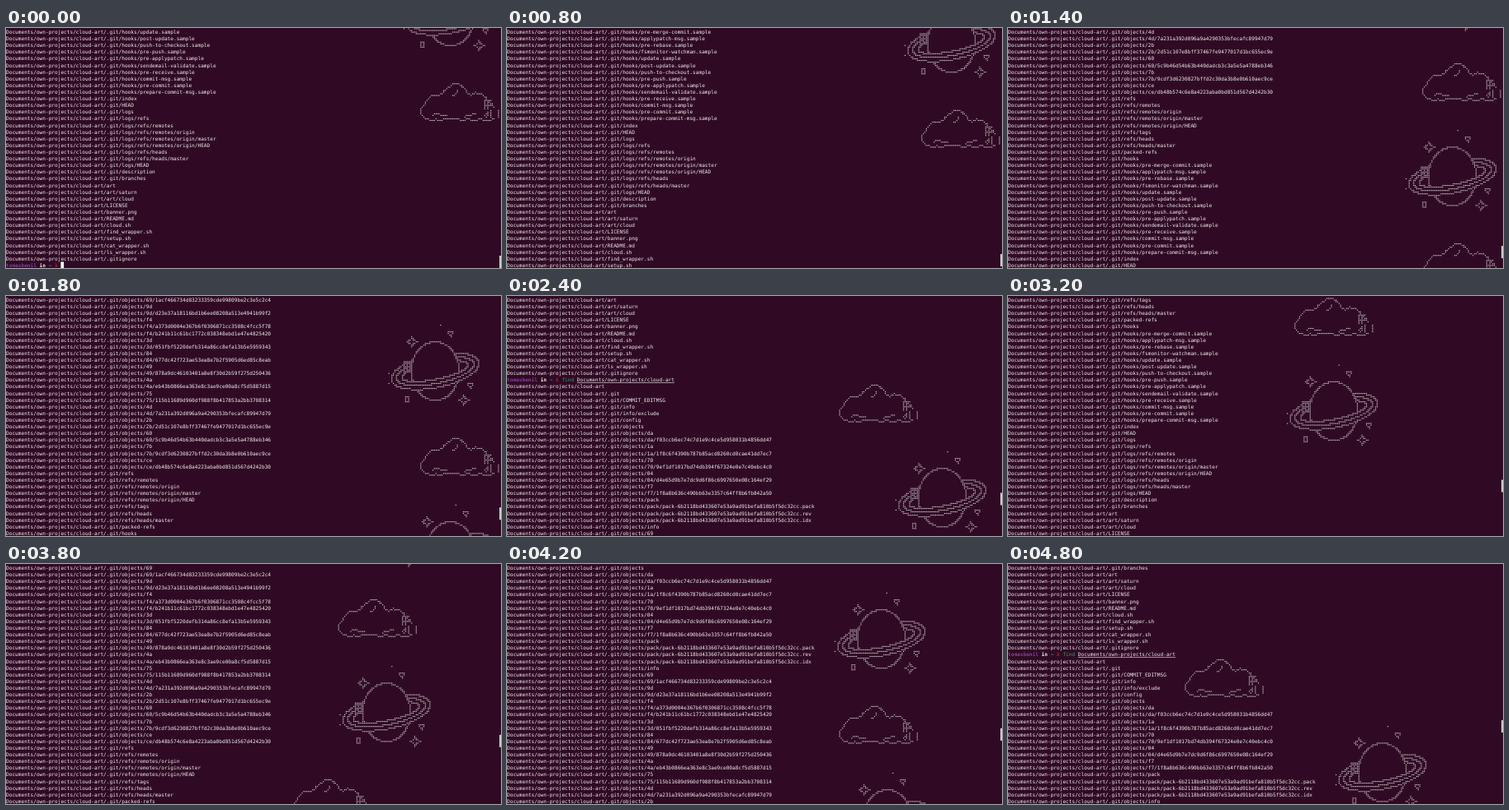
Recreate the animation shown at these times as an HTML page with a canvas. Size 600 by 292 pixels, loop 5 s.

```html
<!DOCTYPE html>
<html lang="en">
<head>
<meta charset="utf-8">
<title>Terminal scrollback</title>
<style>
  html, body { margin: 0; width: 100%; height: 100%; overflow: hidden; background: #300a24; }
  canvas { display: block; width: 600px; height: 292px; }
</style>
</head>
<body>
<canvas id="stage"></canvas>
<script>
const W = 600, H = 292, ROWS = 36, LOOP = 5000;
const CW = 3.69, RH = H / ROWS;
const DX = CW / 2, DY = RH / 4;
const INK = '#f0edf0';
const FONT = '6.13px "DejaVu Sans Mono", monospace';

const canvas = document.getElementById('stage');
const ctx = canvas.getContext('2d');
const ratio = window.devicePixelRatio || 1;
canvas.width = W * ratio;
canvas.height = H * ratio;
ctx.scale(ratio, ratio);

// ---- listing ----
const ROOT = 'Documents/own-projects/cloud-art';
const under = (dir, names) => names.split(' ').map(n => dir + '/' + n);

const blobs = `da/f03ccb6ec74c7d1e9c4ce5d958031b4856dd47
1a/1f8c6f4390b787b85acd8260cd0cae41dd7ec7
70/9ef1df1017bd74db394f67324e0e7c40ebc4c0
04/d4e65d9b7e7dc9d6f86c6997650e08c164ef29
f7/1f8a8b636c490bb63e3357c64ff8b6fb842a50
pack/pack-6b2118bd433607e53a9ad91befa810b5f5dc32cc.pack
pack/pack-6b2118bd433607e53a9ad91befa810b5f5dc32cc.rev
pack/pack-6b2118bd433607e53a9ad91befa810b5f5dc32cc.idx
info/
69/1acf466734d83233359cde99809be2c3e5c2c4
9d/d23e37a18116bd1b6ee08208a513e4941b99f2
f4/a373d0004e367b6f0306871cc3508c4fcc5f78
f4/b241b11c61bc1772c038348ebd1e47e4825420
3d/051fbf5220defb314a86cc8efa13b5e5959343
84/677dc42f723ae53ea8e7b2f5905d6ed85c8eab
49/878a9dc46103401a8e8f30d2b59f275d250436
4a/eb43b0866ea363e8c3ae9ce00a8cf5d5887d15
75/115b11689d960df988f8b417853a2bb3708314
4d/7a231a392d096a9a4290353bfecafc89947d79
2b/2d51c107e8bff37467fe9477017d1bc655ec9e
60/5c9b46d54b63b440dadcb3c3a5e5a4788eb346
7b/9cdf3d6230827bffd2c30da3b8e0b610aec9ce
ce/db48b574c6e8a4223aba0bd851d567d4242b30`.split('\n');

// Each directory is listed once, ahead of its files.
function objectLines() {
  const out = [];
  let last = '';
  for (const blob of blobs) {
    const [dir, file] = blob.split('/');
    if (dir !== last) out.push('.git/objects/' + dir);
    if (file) out.push('.git/objects/' + blob);
    last = dir;
  }
  return out;
}

const hooks = 'pre-merge-commit applypatch-msg pre-rebase fsmonitor-watchman update post-update ' +
  'push-to-checkout pre-push pre-applypatch sendemail-validate pre-receive commit-msg pre-commit prepare-commit-msg';

const listing = [
  ROOT,
  ...[
    '.git',
    ...under('.git', 'COMMIT_EDITMSG info info/exclude config objects'),
    ...objectLines(),
    ...under('.git', 'refs refs/remotes refs/remotes/origin refs/remotes/origin/master ' +
      'refs/remotes/origin/HEAD refs/tags refs/heads refs/heads/master packed-refs hooks'),
    ...under('.git/hooks', hooks).map(n => n + '.sample'),
    ...under('.git', 'index HEAD logs'),
    ...under('.git/logs', 'refs refs/remotes refs/remotes/origin refs/remotes/origin/master ' +
      'refs/remotes/origin/HEAD refs/heads refs/heads/master HEAD'),
    ...under('.git', 'description branches'),
    ...('art art/saturn art/cloud LICENSE banner.png README.md cloud.sh find_wrapper.sh ' +
      'setup.sh cat_wrapper.sh ls_wrapper.sh .gitignore').split(' ')
  ].map(n => ROOT + '/' + n)
];
const BLOCK = listing.length + 1;   // listing plus its prompt

// ---- dot art, in pixels from the top left cell, snapped to 2x4 cell dots ----
function sprite(paint) {
  const dots = new Map();
  const plot = (x, y) => {
    const c = Math.round(x / DX), r = Math.round(y / DY);
    dots.set(c + ',' + r, [c, r]);
  };
  const line = (...p) => {
    for (let i = 0; i + 3 < p.length; i += 2) {
      const [x0, y0, x1, y1] = p.slice(i, i + 4);
      const n = Math.max(1, Math.ceil(Math.max(Math.abs(x1 - x0) / DX, Math.abs(y1 - y0) / DY)));
      for (let k = 0; k <= n; k++) plot(x0 + (x1 - x0) * k / n, y0 + (y1 - y0) * k / n);
    }
  };
  const hatch = (x0, y0, x1, y1) => {
    for (let x = x0; x <= x1; x += DX * 2) line(x, y0, x, y1);
    for (let y = y0; y <= y1; y += DY * 3) line(x0, y, x1, y);
  };
  paint(plot, line, hatch);
  return [...dots.values()];
}

const cloud = sprite((plot, line, hatch) => {
  line(9, 45, 3, 43, 0, 38, 1, 31, 5, 27, 7, 22, 12, 17, 24, 15, 27, 12, 31, 8, 36, 4, 43, 2,
    49, 4, 54, 8, 56, 13, 61, 16, 66, 13, 74, 15, 79, 19, 81, 24, 86, 27, 88, 31);
  line(9, 45, 13, 47, 18, 45, 23, 47, 27, 45, 44, 45, 52, 47, 57, 44, 62, 47, 72, 45, 79, 47, 88, 45);
  line(14, 40, 20, 39, 26, 40, 32, 40);
  line(53, 42, 60, 40, 67, 39);
  line(38, 17, 42, 15, 45, 11);
  hatch(78, 23, 85, 32);
  line(78, 41, 82, 36, 80, 43);
  line(85, 35, 85, 43);
  line(94, 34, 94, 42);
});

const saturn = sprite((plot, line, hatch) => {
  const cx = 58, cy = 58, tilt = -0.2, rx = 29, ry = 35.5;
  const cos = Math.cos(tilt), sin = Math.sin(tilt);
  const onDisc = (x, y) => ((x - cx) / rx) ** 2 + ((y - cy) / ry) ** 2 < 1;
  const inRing = (x, y, a, b) => {
    const u = (x - cx) * cos + (y - cy) * sin, v = (y - cy) * cos - (x - cx) * sin;
    return { inside: (u / a) ** 2 + (v / b) ** 2 < 1, front: v > 0 };
  };
  const ring = (a, b) => {
    for (let t = 0; t < Math.PI * 2; t += 0.02) {
      const u = a * Math.cos(t), v = b * Math.sin(t);
      const x = cx + u * cos - v * sin, y = cy + u * sin + v * cos;
      if (v > 0 || !onDisc(x, y)) plot(x, y);
    }
  };
  ring(54, 20);
  ring(48, 15);
  ring(41, 10);
  for (let t = 0; t < Math.PI * 2; t += 0.02) {
    const x = cx + rx * Math.cos(t), y = cy + ry * Math.sin(t);
    const outer = inRing(x, y, 54, 20), inner = inRing(x, y, 41, 10);
    if (!(outer.inside && outer.front && !inner.inside)) plot(x, y);
  }
  hatch(20, 47, 28, 58);
  const sparkle = (x, y, s, w) =>
    line(x, y - s, x + w, y - w, x + s, y, x + w, y + w, x, y + s, x - w, y + w, x - s, y, x - w, y - w, x, y - s);
  const gem = (x, y) => line(x - 2.5, y - 2, x + 2.5, y - 2, x + 2.5, y + 1, x, y + 4, x - 2.5, y + 1, x - 2.5, y - 2);
  sparkle(30, 22, 6, 2);
  sparkle(93, 93, 6, 2);
  gem(77, 12);
  gem(24, 92);
  gem(101, 75);
  plot(65, 3);
  plot(1, 61);
  plot(1, 73);
});

// [first line, column, shape]; line 0 opens the newest listing
const art = [
  [0, 109, cloud], [10, 127, saturn], [27, 125, saturn],
  [44, 136, cloud], [54, 130, saturn], [71, 136, cloud],
  [-99, 58, cloud], [-89, 107, saturn], [-72, 109, cloud],
  [-62, 109, saturn], [-45, 94, cloud], [-35, 91, saturn]
];

// ---- scrolling: [time, top line], in wheel notches of four lines ----
const scroll = [
  [0, 63], [800, 59], [1000, 47], [1400, 39], [1600, 31], [1800, 23], [2000, 11], [2400, -13],
  [2600, -21], [2800, -29], [3000, -37], [3200, -45], [3400, -57], [3600, -65], [3800, -77],
  [4000, -85], [4200, -93], [4400, -105], [4800, -113]
];
const topAt = t => scroll.filter(s => s[0] <= t).pop()[1];

// ---- drawing ----
function put(text, col, row, color = INK, bold = false) {
  ctx.font = (bold ? 'bold ' : '') + FONT;
  ctx.fillStyle = color;
  for (let i = 0; i < text.length; i++) {
    if (text[i] !== ' ') ctx.fillText(text[i], (col + i) * CW, row * RH + 7);
  }
}

function drawPrompt(row, command) {
  put('tomasbenil', 0, row, '#80429c', true);
  put('in', 11, row, INK, true);
  put('~', 14, row, '#2aa1b3', true);
  put('λ', 16, row, '#c01c28', true);
  if (!command) return;
  put('find', 18, row, '#26a269');
  put(ROOT, 23, row);
  ctx.fillRect(23 * CW, row * RH + 7.8, ROOT.length * CW, 0.6);
}

function drawArt(first, col, dots, top) {
  const y = (first - top) * RH;
  if (y > H || y < -14 * RH) return;
  ctx.fillStyle = 'rgba(240, 237, 240, 0.85)';
  for (const [c, r] of dots) ctx.fillRect(col * CW + c * DX + 0.4, y + r * DY + 0.4, 1.15, 1.15);
}

function draw(top, cursor) {
  ctx.fillStyle = '#300a24';
  ctx.fillRect(0, 0, W, H);
  ctx.textRendering = 'geometricPrecision';
  for (let row = 0; row < ROWS; row++) {
    const line = top + row;
    const i = (line + 2 * BLOCK) % BLOCK;
    if (i < listing.length) put(listing[i], 0, row);
    else drawPrompt(row, line < 0);
    if (line === listing.length && cursor) {
      ctx.fillStyle = '#fff';
      ctx.fillRect(18 * CW, row * RH + 0.6, CW, RH - 0.6);
    }
  }
  for (const [first, col, dots] of art) drawArt(first, col, dots, top);
  ctx.fillStyle = '#cfc8cd';
  ctx.fillRect(598, 277 - (63 - top) * 0.494, 2, 15);
}

const start = performance.now();
let shown = '';
function tick() {
  const t = (performance.now() - start) % LOOP;
  const top = topAt(t), cursor = t < 200;
  const state = top + '|' + cursor;
  if (state !== shown) {
    draw(top, cursor);
    shown = state;
  }
  requestAnimationFrame(tick);
}
tick();
</script>
</body>
</html>
```
